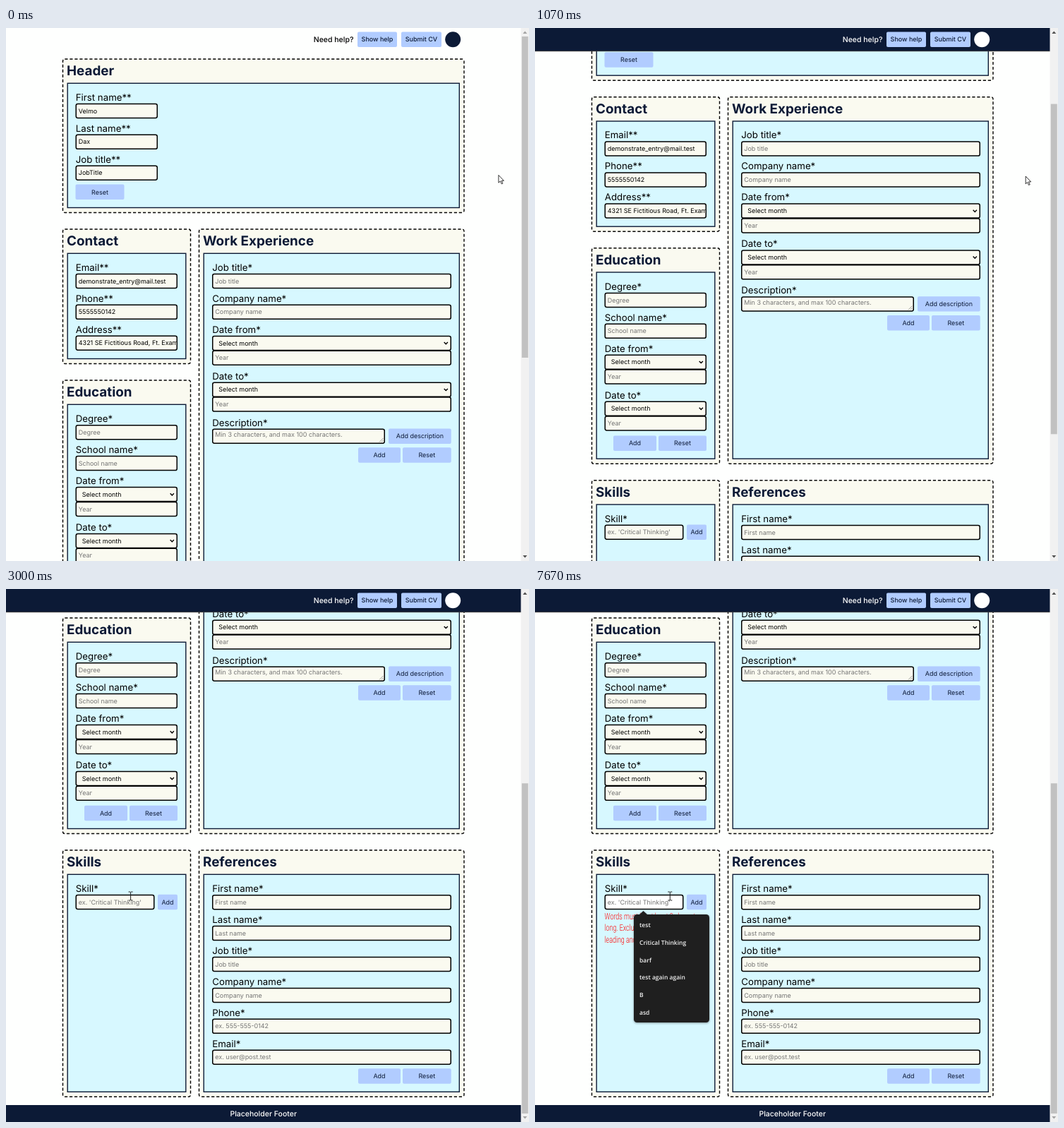
An HTML page for the animation above (8 s loop, 741 by 755 pixels).

```html
<!DOCTYPE html>
<html lang="en">
<head>
<meta charset="utf-8">
<title>CV form</title>
<style>
  html, body { margin: 0; width: 100%; height: 100%; overflow: hidden; background: #fefffe; }
  svg { display: block; }
  text {
    font: 400 8.97px Inter, Roboto, sans-serif;
    font-optical-sizing: none;
    text-rendering: geometricPrecision;
    white-space: pre;
  }
  .title { font-size: 18.85px; font-weight: 700; fill: #0c1a36; }
  .label { font-size: 13.25px; }
  .hint { fill: #757575; }
  .btn { fill: #0c1a36; text-anchor: middle; }
  .strong { font-weight: 500; }
  .bar { font-size: 10.5px; font-weight: 500; }
  .error { font: 300 12.6px Roboto, sans-serif; fill: #f00; }
  .option { font: 600 8.5px "Open Sans", "Noto Sans", sans-serif; fill: #f2f2f2; }
</style>
</head>
<body>
<svg id="stage" width="100%" height="100%" viewBox="0 0 741 755"></svg>
<script>
const NAVY = '#0c1a36', CREAM = '#fafaf0', SKY = '#d7f8ff', BLUE = '#b1ccff';
const LOOP = 8000, STEP = 200 / 3, MAX = 458, BAR = 33, ROW = 43.9;

const rect = (x, y, w, h, attrs) =>
  `<rect x="${x}" y="${y}" width="${w}" height="${h}" ${attrs}/>`;
const text = (x, y, cls, str, attrs = '') =>
  `<text x="${x}" y="${y}" class="${cls}" ${attrs}>${str}</text>`;

// Dashes of 4.2 with a gap that fits a whole number of them round the box
function dashes(w, h, r) {
  const length = 2 * (w + h) - (8 - 2 * Math.PI) * r;
  return `4.2 ${length / Math.round(length / 7) - 4.2}`;
}

// Dashed card with a heading and a solid inner panel
function card(x, y, right, bottom, title) {
  const w = right - x, h = bottom - y, r = 2.8;
  return rect(x, y, w, h,
      `rx="${r}" fill="${CREAM}" stroke="#000" stroke-width="1.4" stroke-dasharray="${dashes(w, h, r)}"`) +
    text(x + 5.5, y + 23.4, 'title', title) +
    rect(x + 6.7, y + 34.3, w - 13.4, h - 41.3,
      `fill="${SKY}" stroke="${NAVY}" stroke-width="1.4"`);
}

function box(x, cy, w, str, cls = '', id = '') {
  return rect(x + .75, cy - 10, w - 1.5, 20,
      `rx="2.4" fill="${CREAM}" stroke="#000" stroke-width="1.5" ${id && `id="${id}"`}`) +
    `<svg x="${x}" y="${cy - 10}" width="${w - 1.5}" height="20">` +
    text(4.3, 13.2, cls, str) + '</svg>';
}

const label = (x, cy, str) => text(x, cy + 4.8, 'label', str);
const field = (x, cy, w, name, str, cls = 'hint') =>
  label(x + .3, cy, name) + box(x, cy + 19.4, w, str, cls);

function dates(x, cy, w) {
  return ['Date from*', 'Date to*'].map((name, i) => {
    const y = cy + i * 65.9, mid = y + 19.4, end = x + w - 10.3;
    return label(x + .3, y, name) + box(x, mid, w, '  Select month') +
      `<path d="M${end} ${mid - 1.4}l2.6 2.7 2.6-2.7" fill="none" stroke="#000" stroke-width="1.4"/>` +
      box(x, mid + 20.8, w, 'Year', 'hint');
  }).join('');
}

function button(x, cy, right, str, cls = '', id = '') {
  return rect(x, cy - 10.7, right - x, 21.4, `rx="2" fill="${BLUE}" ${id && `id="${id}"`}`) +
    text((x + right) / 2, cy + 3.2, 'btn ' + cls, str);
}

const fields = (x, cy, w, rows, cls) =>
  rows.map(([name, str], i) => field(x, cy + i * ROW, w, name, str, cls)).join('');

function page() {
  const L = 98.5, R = 292, W = 144.5, WW = 339;
  const errors = ['Words must be at least 3 characters',
    'long. Exclude special characters,', 'leading and trailing spaces.'];
  return card(80.5, 44, 649, 261.5, 'Header') +
    fields(L, 98, 116.5, [['First name**', 'Velmo'], ['Last name**', 'Dax'],
      ['Job title**', 'JobTitle']], '') +
    button(98.5, 232.3, 167.5, 'Reset') +

    card(80.5, 285, 261.5, 475.5, 'Contact') +
    fields(L, 339, W, [['Email**', 'demonstrate_entry@mail.test'], ['Phone**', '5555550142'],
      ['Address**', '4321 SE Fictitious Road, Ft. Example']], '') +

    card(273.5, 285, 649, 804.5, 'Work Experience') +
    fields(R, 339, WW, [['Job title*', 'Job title'], ['Company name*', 'Company name']]) +
    dates(R, 427, WW) +
    label(R + .3, 558.8, 'Description*') +
    box(R, 578.2, 245, '') +
    text(296.3, 579.4, 'hint', 'Min 3 characters, and max 100 characters.') +
    '<path d="M529 586.5l5.5-5.5m-2.5 5.5l2.5-2.5" stroke="#777" stroke-width=".7"/>' +
    button(542, 578.2, 630.7, 'Add description') +
    button(499, 605, 559, 'Add') + button(562, 605, 630.7, 'Reset') +

    card(80.5, 499, 261.5, 804.5, 'Education') +
    fields(L, 553.3, W, [['Degree*', 'Degree'], ['School name*', 'School name']]) +
    dates(L, 641.2, W) +
    button(111, 775.5, 172, 'Add') + button(175, 775.5, 243, 'Reset') +

    card(80.5, 828, 261.5, 1177.3, 'Skills') +
    label(L + .3, 882.3, 'Skill*') +
    box(L, 901.5, 112, "ex. 'Critical Thinking'", 'hint', 'skill') +
    button(215, 901.5, 243, 'Add', '', 'add') +
    rect(103, 896.3, 1, 10.6, 'id="caret"') +
    '<g id="error" transform="translate(98.6 925.6) scale(.707 1)">' +
    errors.map((line, i) => text(0, i * 16.5, 'error', line)).join('') + '</g>' +

    card(273.5, 828, 649, 1177.3, 'References') +
    fields(R, 882.3, WW, [['First name*', 'First name'], ['Last name*', 'Last name'],
      ['Job title*', 'Job title'], ['Company name*', 'Company name'],
      ['Phone*', 'ex. 555-555-0142'], ['Email*', 'ex. user@post.test']]) +
    button(499, 1148, 559, 'Add') + button(562, 1148, 630.7, 'Reset') +

    rect(0, 1189, 730, 30, `fill="${NAVY}"`) +
    text(364.7, 1205, 'bar', 'Placeholder Footer', 'fill="#fff" text-anchor="middle"');
}

function popup() {
  const options = ['test', 'Critical Thinking', 'barf', 'test again again', 'B', 'asd'];
  return '<g id="popup" style="filter:drop-shadow(0 1px 1.5px #0006)">' +
    '<path d="M147.5 461.5l6-5.5 6 5.5z" fill="#1f1f1f"/>' +
    rect(140, 461, 107, 153, 'rx="4.5" fill="#1f1f1f"') +
    options.map((o, i) => text(148, 479.1 + i * 24.7, 'option', o)).join('') + '</g>';
}

const topbar =
  `<g id="back">${rect(0, 0, 730, BAR, `fill="${NAVY}"`)}</g>` +
  rect(0, 32.2, 730, 1, 'id="line" fill="#3a3a3a"') +
  text(435.7, 19.8, 'bar', 'Need help?', 'id="help"') +
  button(498, 16.2, 554, 'Show help', 'strong') +
  button(560, 16.2, 617, 'Submit CV', 'strong') +
  '<circle id="badge" cx="633.2" cy="16.2" r="11"/>';

const scrollbar = rect(729.5, 0, 12, 755, 'fill="#f1f1f1"') +
  '<path id="up" d="M732.3 8l3-3.4 3 3.4z"/><path id="down" d="M732.3 747l3 3.4 3-3.4z"/>' +
  '<rect id="thumb" x="730.8" width="9" fill="#c1c1c1"/>';

const outline = 'fill="#fff" stroke="#000" stroke-width=".8" stroke-linejoin="round"';
const cursors =
  `<path id="arrow" d="M.4.4v10.8l2.5-2.3 1.8 4 1.7-.8-1.8-3.8h3.3z" ${outline}/>` +
  '<path id="beam" d="M-3-6h2.3l.7.6.7-.6H3M0-5.4V5.4M-3 6h2.3l.7-.6.7.6H3" fill="none" stroke="#222"/>' +
  `<path id="hand" d="M-1 .6q1-1.2 2 0v3.8q1-.8 2 0 1-.7 2 .1 1.4-.4 1.7.7v3l-1.2 2.8h-5.3l-3.4-4.4q.2-1.5 2.2.2z" ${outline}/>`;

const $ = id => document.getElementById(id);
$('stage').innerHTML = `<g id="page">${page()}</g>${topbar}${popup()}${scrollbar}<g id="cursor">${cursors}</g>`;

const linear = u => u, smooth = u => u * u * (3 - 2 * u);

// Value list at time t from [time, ...values] keys
function track(keys, t, ease) {
  if (t <= keys[0][0]) return keys[0].slice(1);
  for (let i = 1; i < keys.length; i++) {
    const [a, b] = [keys[i - 1], keys[i]];
    if (t < b[0]) {
      const u = ease((t - a[0]) / (b[0] - a[0]));
      return a.slice(1).map((v, j) => v + (b[j + 1] - v) * u);
    }
  }
  return keys[keys.length - 1].slice(1);
}

const scrollKeys = [[800, 36.5], [867, 67], [1067, 187.5], [1400, 384],
  [1533, 444], [1600, 456], [1667, MAX]];
const pointerKeys = [[0, 697.5, 208], [200, 694.8, 209.6], [1600, 694.8, 209.6],
  [2400, 221, 440], [2533, 221, 440], [2733, 196, 412], [3000, 176.6, 435],
  [3333, 235, 445], [3667, 235, 445], [4200, 203.5, 435], [4333, 203.5, 435],
  [4867, 184, 438], [5000, 184, 438], [5133, 186.5, 437], [5200, 186.5, 437], [5267, 191.3, 435]];

const show = (id, on) => $(id).setAttribute('visibility', on ? 'visible' : 'hidden');
const fill = (id, color) => $(id).setAttribute('fill', color);

function draw(time) {
  // The screen refreshes fifteen times a second
  const t = Math.floor((time + 4) / STEP) * STEP + .01;
  const stuck = t >= 800;
  const shift = stuck ? track(scrollKeys, t, linear)[0] : 0;
  $('page').setAttribute('transform', `translate(0 ${-shift})`);

  $('back').setAttribute('opacity', Math.max(0, Math.min(1, (t - 800) / 200)));
  show('line', stuck);
  fill('help', stuck ? '#fff' : '#000');
  fill('badge', stuck ? '#fff' : NAVY);

  // The bar leaves the flow once stuck, so the document gets shorter
  const ratio = 731 / (stuck ? 1180 : 1213);
  $('thumb').setAttribute('y', 12 + (stuck ? shift - BAR : 0) * ratio);
  $('thumb').setAttribute('height', 755 * ratio);
  fill('up', stuck ? '#505050' : '#a3a3a3');
  fill('down', shift >= MAX ? '#a3a3a3' : '#505050');

  const focus = t >= 5000;
  show('error', t >= 3466);
  fill('add', t >= 3466 && t < 3533 ? '#c3d8ff' : BLUE);
  fill('skill', focus ? '#fff' : CREAM);
  show('popup', focus);
  show('caret', focus && Math.floor((t - 5000) / (8 * STEP)) % 2 === 0);

  const [x, y] = track(pointerKeys, t, smooth);
  const inRow = y > 432.5 && y < 454.5;
  const kind = inRow && x > 98 && x < 210.5 ? 'beam' : inRow && x > 215 && x < 243 ? 'hand' : 'arrow';
  $('cursor').setAttribute('transform', `translate(${x} ${y})`);
  for (const id of ['arrow', 'beam', 'hand']) show(id, id === kind);
}

const start = performance.now();
function tick() {
  draw((performance.now() - start) % LOOP);
  requestAnimationFrame(tick);
}
tick();
</script>
</body>
</html>
```
